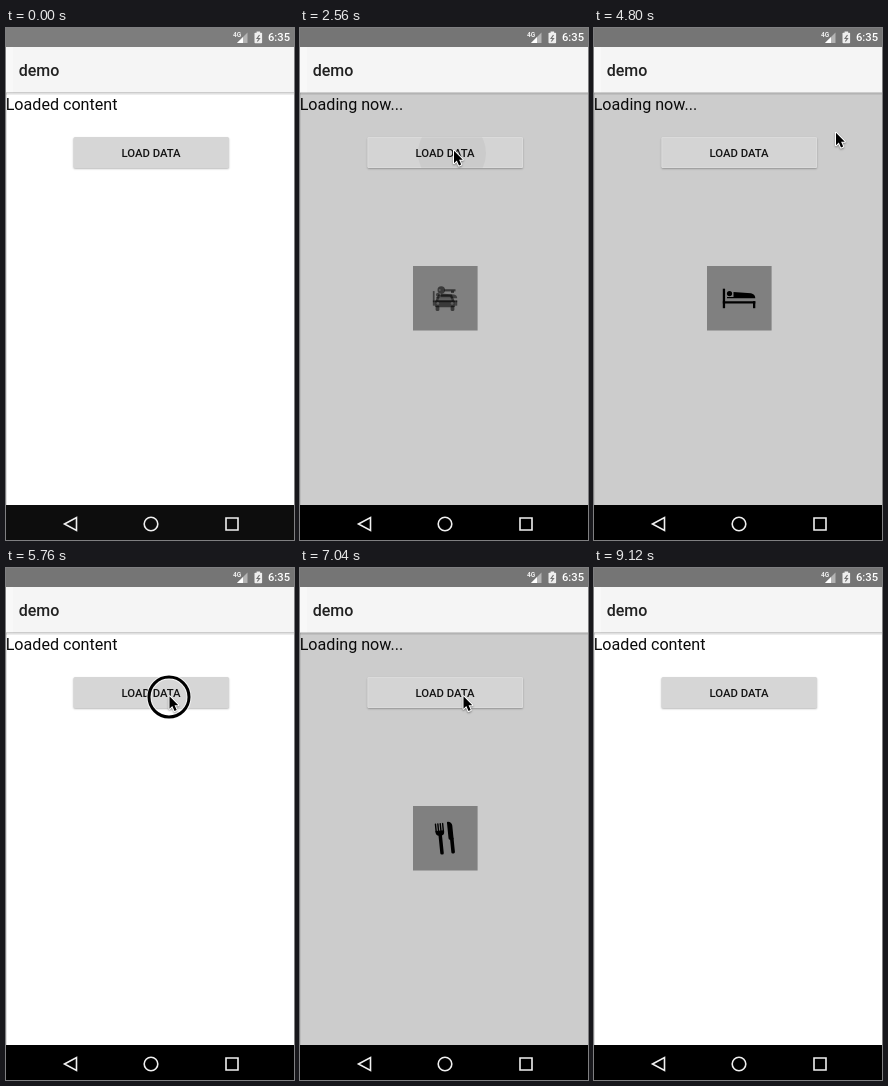
Animation of 288 by 512 pixels, one loop 9280 ms. Source, as an HTML page with a canvas:

```html
<!DOCTYPE html>
<html lang="en">
<head>
<meta charset="utf-8">
<title>Loading demo</title>
<style>
html, body { margin: 0; width: 288px; height: 512px; overflow: hidden; background: #fff; }
canvas { display: block; }
</style>
</head>
<body>
<canvas id="stage" width="288" height="512"></canvas>
<script>
const ctx = document.getElementById('stage').getContext('2d');
const W = 288, H = 512, MID = W / 2 + 1;
const LOOP = 9280, STEP = 160, LOAD_TIME = 2400;
const FIRST_CLICK = 2400, SECOND_CLICK = 5760;
const STATUS_H = 19, HEADER_END = 65, NAV_TOP = 477;

const clamp = v => Math.max(0, Math.min(1, v));
const ease = v => v * v * (3 - 2 * v);
const gray = v => `rgb(${v}, ${v}, ${v})`;
const shade = alpha => `rgba(0, 0, 0, ${alpha})`;

function rect(x, y, w, h, color, radius = 0) {
  ctx.beginPath();
  ctx.roundRect(x, y, w, h, radius);
  ctx.fillStyle = color;
  ctx.fill();
}

function disc(x, y, r, color) {
  ctx.beginPath();
  ctx.arc(x, y, r, 0, Math.PI * 2);
  ctx.fillStyle = color;
  ctx.fill();
}

function ring(x, y, r, color, width) {
  ctx.beginPath();
  ctx.arc(x, y, r, 0, Math.PI * 2);
  ctx.strokeStyle = color;
  ctx.lineWidth = width;
  ctx.stroke();
}

function fillPath(path, color = '#000') {
  ctx.fillStyle = color;
  ctx.fill(new Path2D(path));
}

function strokePath(path, color, width) {
  ctx.strokeStyle = color;
  ctx.lineWidth = width;
  ctx.stroke(new Path2D(path));
}

function text(str, x, y, size, weight, color, align = 'left') {
  ctx.font = `${weight} ${size}px Roboto, sans-serif`;
  ctx.textAlign = align;
  ctx.fillStyle = color;
  ctx.fillText(str, x, y);
}

// Runs a drawing with its own origin and restores the state afterwards.
function at(x, y, paint) {
  ctx.save();
  ctx.translate(x, y);
  paint();
  ctx.restore();
}

function drawStatusBar(lift) {
  rect(0, 0, W, STATUS_H, gray(117 + 8 * lift));
  text('4G', 227, 9, 6.5, 700, '#eee');
  at(231, 15, () => {
    fillPath('M0 0h10.5v-10.5z', gray(180));
    fillPath('M0 0h6v-6z', '#fff');
  });
  at(252.3, 10, () => {
    rect(-1.7, -6.5, 3.5, 2, '#eee');
    rect(-3.8, -5.2, 7.6, 10.4, '#eee', 0.8);
    strokePath('M1.2 -3L-1.2 .5H1.2L-1 3.5', gray(117), 1.2);
  });
  text('6:35', 262, 13.3, 11.2, 500, '#fff');
}

function drawHeader() {
  rect(0, STATUS_H, W, HEADER_END - STATUS_H, gray(245));
  rect(0, STATUS_H, 7, HEADER_END - STATUS_H, gray(248));
  for (let i = 0; i < 3; i++) rect(0, HEADER_END - 1 + i, W, 1, shade(0.17 - 0.05 * i));
  text('demo', 12.7, 47.6, 16, 500, gray(33));
}

function drawNavBar(lift) {
  const y = 496, color = gray(240), line = 1.6;
  rect(0, NAV_TOP, W, H - NAV_TOP, gray(13 * lift));
  at(MID - 80.5, y, () => strokePath('M-6 0L6 -6.5V6.5Z', color, line));
  ring(MID, y, 6.8, color, line);
  at(MID + 81, y, () => strokePath('M-6 -6H6V6H-6Z', color, line));
}

function drawButton(loading, ripple) {
  const x = 67.5, y = 109, w = 155.5, h = 31;
  ctx.save();
  ctx.shadowColor = shade(0.28);
  ctx.shadowBlur = 2;
  ctx.shadowOffsetY = 1;
  rect(x, y, w, h, gray(loading ? 212 : 214), 1.5);
  ctx.restore();
  ctx.save();
  ctx.beginPath();
  ctx.roundRect(x, y, w, h, 1.5);
  ctx.clip();
  if (loading) {
    ctx.strokeStyle = gray(222);
    ctx.lineWidth = 1.5;
    ctx.stroke();
  }
  disc(152, 125, 34, shade(0.045 * ripple));
  ctx.restore();
  text('LOAD DATA', MID, 129, 11.35, 500, gray(20), 'center');
}

function drawCar() {
  disc(-5, -11, 5, '#000');
  disc(-7, -11, 1.3, gray(128));
  rect(-1, -12, 15, 3, '#000');
  rect(8, -10, 4, 3, '#000');
  fillPath('M-13 4L-9 -5H9L13 4Z');
  fillPath('M-9 3L-7 -2H7L9 3Z', gray(128));
  rect(-14, 3, 28, 9, '#000', 3);
  for (const side of [-1, 1]) {
    disc(side * 9.5, 7, 1.8, gray(128));
    rect(side * 10 - 2.5, 10, 5, 7, '#000', 1.5);
  }
}

function drawCutlery() {
  for (let i = 0; i < 4; i++) rect(-8.8 + 2.4 * i, -15.5, 1.4, 9, '#000', 0.6);
  rect(-8.8, -8, 8.6, 5, '#000', [0, 0, 3.5, 3.5]);
  rect(-6.2, -5, 3.5, 21, '#000', 1.5);
  rect(3.5, -16, 5, 18, '#000', [1, 5, 0, 2]);
  rect(4.9, 0, 3.6, 16, '#000', 1.5);
}

function drawBed() {
  rect(-16.2, -9.5, 2.3, 19.5, '#000');
  rect(-16.2, 3, 32.5, 2.4, '#000');
  rect(14, 3, 2.3, 7, '#000');
  disc(-9.5, -4.6, 2.6, '#000');
  fillPath('M-5.5 -6.2L12 -5Q16.3 -4 16.3 0H-12V-1.3H-5.5Z');
}

const ICONS = [drawCar, drawCutlery, drawBed];

function drawIcon(index, alpha, scale, angle) {
  at(MID, 270.2, () => {
    ctx.globalAlpha = alpha;
    ctx.rotate(angle);
    ctx.scale(scale, scale);
    ICONS[index]();
  });
}

// Icons take equal turns, shrinking and fading into each other at each swap.
function drawLoader(elapsed) {
  const turn = LOAD_TIME / ICONS.length;
  const index = Math.floor(elapsed / turn);
  const local = elapsed % turn;
  const near = clamp(Math.min(local, turn - local) / STEP);
  const wobble = -0.1 * Math.sin(Math.PI * local / (0.8 * turn));
  rect(113, 238, 64.6, 64.6, gray(128));
  if (local < STEP) drawIcon((index + 2) % ICONS.length, 0.5 * (1 - near), 0.75, 0);
  drawIcon(index, 0.55 + 0.45 * near, 0.75 + 0.25 * near, wobble);
}

const POINTER_START = { x: 83, y: 150, time: 800 };
const POINTER_MOVES = [
  { from: 800, to: 1120, x: 165, y: 121 },
  { from: 1120, to: 1440, x: 153.5, y: 122 },
  { from: 3360, to: 4480, x: 241.5, y: 104 },
  { from: 5120, to: 5440, x: 163, y: 127.5 },
  { from: 8640, to: 9120, x: -20, y: 30 }
];

function drawPointer(t) {
  let { x, y, time } = POINTER_START;
  if (t < time) return;
  for (const move of POINTER_MOVES) {
    const k = ease(clamp((t - move.from) / (move.to - move.from)));
    x += (move.x - x) * k;
    y += (move.y - y) * k;
  }
  at(x, y, () => {
    const arrow = 'M.5 .8V13.2L3.3 10.6L5.5 15.6L7.7 14.6L5.6 9.8H9.3Z';
    ctx.lineJoin = 'round';
    ctx.shadowColor = shade(0.4);
    ctx.shadowBlur = 2;
    ctx.shadowOffsetY = 1;
    strokePath(arrow, '#fff', 2);
    ctx.shadowColor = 'transparent';
    fillPath(arrow);
  });
}

function drawClickRing() {
  ring(163, 129, 20, 'rgba(255, 255, 255, .75)', 5);
  ring(163, 129, 20, '#000', 3);
}

function draw(t) {
  const since = t - (t < SECOND_CLICK ? FIRST_CLICK : SECOND_CLICK);
  const elapsed = since - STEP;
  const loading = elapsed >= 0 && elapsed < LOAD_TIME;
  const lift = clamp(1 - t / 480);

  rect(0, 0, W, H, gray(loading ? 204 : 255));
  rect(0, HEADER_END, 1, NAV_TOP - HEADER_END, gray(loading ? 187 : 222));
  drawStatusBar(lift);
  drawHeader();
  drawNavBar(lift);
  text(loading ? 'Loading now...' : 'Loaded content', -0.3, 81.6, 16.1, 400, gray(10));
  drawButton(loading, loading ? clamp(1 - elapsed / 480) : 0);
  if (loading) drawLoader(elapsed);
  if (t === SECOND_CLICK) drawClickRing();
  drawPointer(t);
}

const start = performance.now();
function tick() {
  const t = (performance.now() - start) % LOOP;
  draw(Math.floor(t / STEP) * STEP);
  requestAnimationFrame(tick);
}
tick();
</script>
</body>
</html>
```
